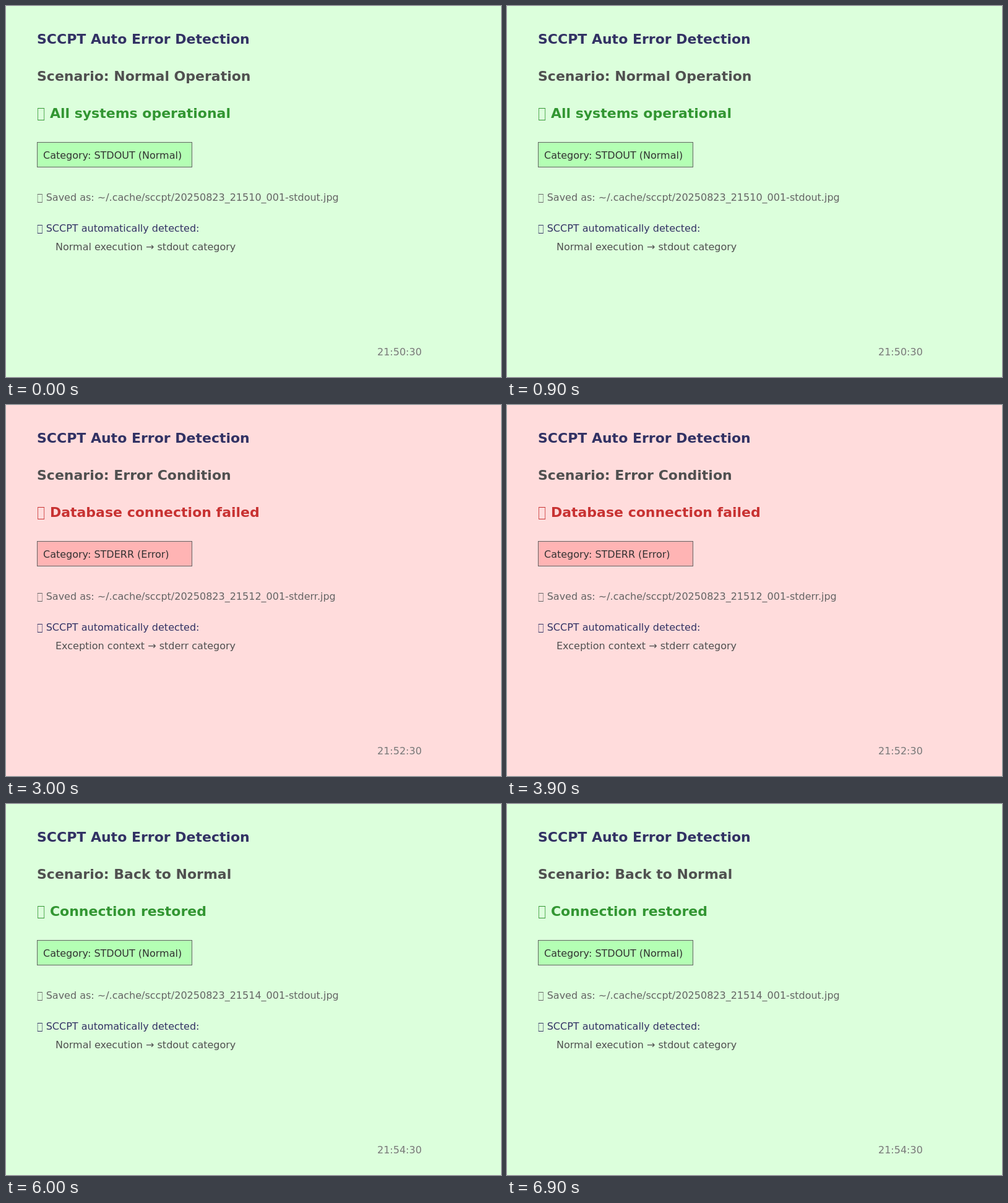
An HTML page for the animation above (7500 ms loop, 800 px wide and 600 px high).

```html
<!DOCTYPE html>
<html lang="en">
<head>
<meta charset="utf-8">
<title>Auto Error Detection</title>
<style>
  html, body { margin: 0; width: 100%; height: 100%; overflow: hidden; }
  svg { display: block; width: 100%; height: 100%; }
  text { font: 16px "DejaVu Sans", sans-serif; white-space: pre; }
  .big { font-size: 22px; font-weight: bold; }
</style>
</head>
<body>
<svg id="stage" viewBox="0 0 800 600"></svg>
<script>
const SCENE_MS = 1500;
const NAVY = "#323264";
const DARK = "#505050";
const GRAY = "#646464";

const scenes = [
  { name: "Normal Operation", status: "All systems operational", bg: "#dcffdc" },
  { name: "Warning Detected", status: "⚠  High memory usage detected", bg: "#ffffc8", warning: true },
  { name: "Error Condition", status: "Database connection failed", bg: "#ffdcdc", error: true },
  { name: "Error Recovery", status: "Attempting reconnection...", bg: "#fff0c8" },
  { name: "Back to Normal", status: "Connection restored", bg: "#dcffdc" }
];

const stage = document.getElementById("stage");

function add(tag, attrs, content = "") {
  const node = document.createElementNS("http://www.w3.org/2000/svg", tag);
  for (const key in attrs) node.setAttribute(key, attrs[key]);
  node.textContent = content;
  return stage.appendChild(node);
}

const label = (x, y, fill, content) => add("text", { x, y, fill }, content);

function heading(x, y, fill, content) {
  const node = label(x, y, fill, content);
  node.setAttribute("class", "big");
  return node;
}

// Hollow box standing for a missing glyph
function emptyGlyph(left, right, top, bottom, side, fill) {
  const d = `M${left} ${top}H${right}V${bottom}H${left}Z` +
    `M${left + side} ${top + 1}H${right - side}V${bottom - 1}H${left + side}Z`;
  return add("path", { d, fill, "fill-rule": "evenodd" });
}

const smallGlyph = (baseline, fill) =>
  emptyGlyph(50.8, 58.8, baseline - 11, baseline + 3, 0.6, fill);

const background = add("rect", { width: 800, height: 600 });
heading(50, 61, NAVY, "SCCPT Auto Error Detection");
const scenario = heading(50, 121, DARK);
const statusGlyph = emptyGlyph(51.1, 62.1, 165, 185, 0.8, "none");
const status = heading(50, 181, "none");
const badge = add("rect", { x: 50.5, y: 220.5, width: 250, height: 40, stroke: GRAY });
const category = label(60, 247, "#323232");
smallGlyph(315, GRAY);
const saved = label(64.7, 315, GRAY);
smallGlyph(365, NAVY);
label(64.7, 365, NAVY, "SCCPT automatically detected:");
const reason = label(80, 395, DARK);
const clock = label(600, 565, "#787878");

let shown = -1;

function show(index) {
  if (index === shown) return;
  shown = index;
  const { name, status: message, bg, warning, error } = scenes[index];
  const stream = error ? "stderr" : "stdout";
  const accent = error ? "#c83232" : "#329632";

  background.setAttribute("fill", bg);
  scenario.textContent = `Scenario: ${name}`;
  statusGlyph.setAttribute("fill", warning ? "none" : accent);
  status.setAttribute("x", warning ? 50 : 70.9);
  status.setAttribute("fill", accent);
  status.textContent = message;
  badge.setAttribute("fill", error ? "#ffb4b4" : "#b4ffb4");
  category.textContent = `Category: ${stream.toUpperCase()} (${error ? "Error" : "Normal"})`;
  saved.textContent = `Saved as: ~/.cache/sccpt/20250823_2151${index}_001-${stream}.jpg`;
  reason.textContent = `${error ? "Exception context" : "Normal execution"} → ${stream} category`;
  clock.textContent = `21:5${index}:30`;
}

function tick() {
  show(Math.floor(performance.now() / SCENE_MS) % scenes.length);
  requestAnimationFrame(tick);
}

show(0);
tick();
</script>
</body>
</html>
```
